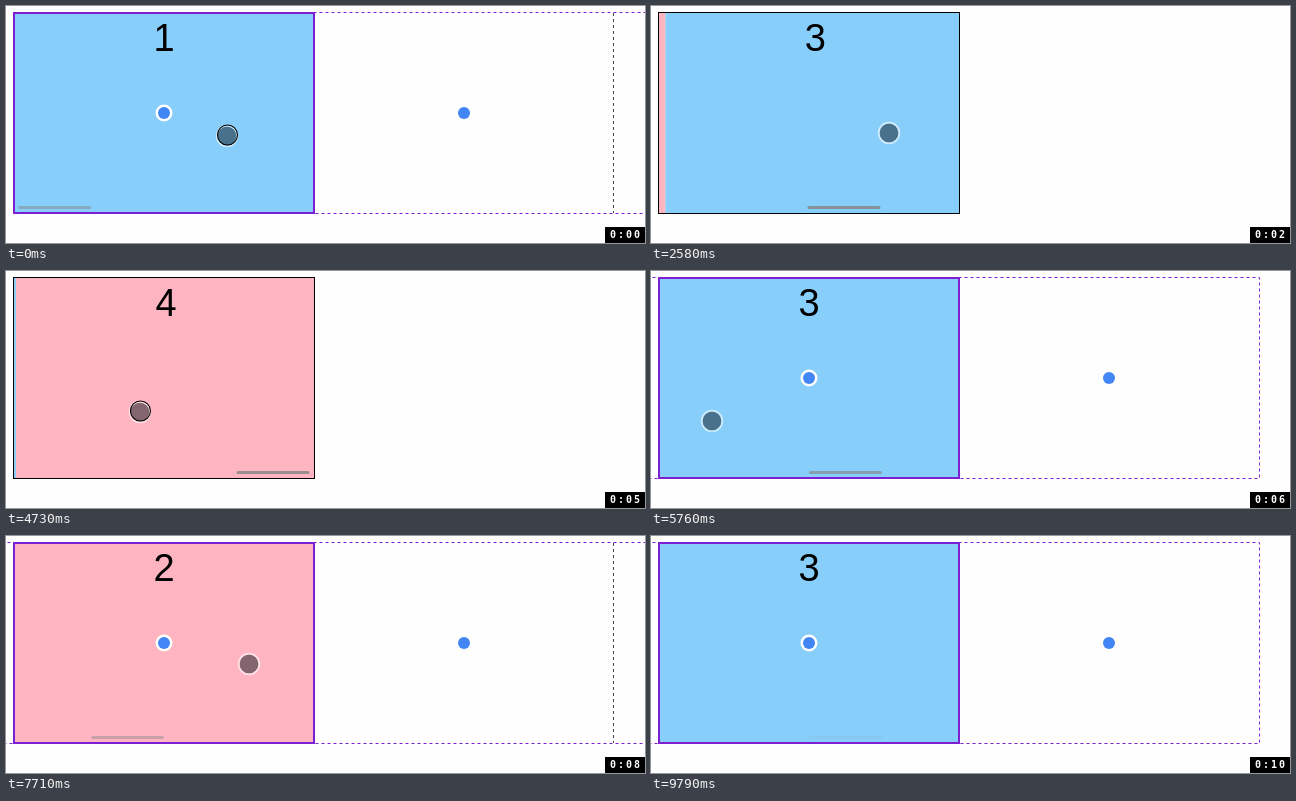
These frames come from a looping animation (639x237 px, 9.83 s). An HTML page with a canvas:

```html
<!DOCTYPE html>
<html lang="en">
<head>
<meta charset="utf-8">
<title>Scroll snap</title>
<style>
html, body { margin: 0; width: 639px; height: 237px; overflow: hidden; background: #fefefe; }
canvas { display: block; }
</style>
</head>
<body>
<canvas id="stage" width="639" height="237"></canvas>
<script>
const ctx = document.getElementById('stage').getContext('2d');
const LOOP = 9830, PAGE = 300, LEFT = 8, TOP = 7, HEIGHT = 200;
const DRAG = 400, TAU = 120, SETTLE = 600, FADE = 400;
const PURPLE = '#7d1fd2';

// Each swipe: drag start time, page left behind, finger path
const swipes = [
  { start: 670, page: 0, from: [221, 130], to: [120, 135] },
  { start: 1778, page: 1, from: [238, 127], to: [122, 134] },
  { start: 3250, page: 2, from: [238, 127], to: [124, 138] },
  { start: 4676, page: 3, from: [132, 141], to: [235, 143] },
  { start: 6522, page: 2, from: [61, 150], to: [224, 147] },
  { start: 8435, page: 1, from: [243, 128], to: [130, 133] },
];
const exit = [540, 252];

const clamp = v => Math.max(0, Math.min(1, v));
const smooth = v => v * v * (3 - 2 * v);
const mix = (a, b, p) => a.map((v, i) => v + (b[i] - v) * p);

function stateAt(t) {
  const i = swipes.findLastIndex(s => t >= s.start);
  const next = swipes[i + 1];
  const lead = i < 0 ? 670 : 100;
  const pressed = !!next && t > next.start - lead - 1;
  if (i < 0) return { scroll: 0, finger: next.from, pressed, idle: true, bar: 0.6 };

  const { start, page, from, to } = swipes[i];
  const age = t - start, origin = page * PAGE;
  if (age < DRAG) {
    const finger = mix(from, to, (age / DRAG) ** 2);
    return { scroll: origin + from[0] - finger[0], finger, pressed: true, idle: false, bar: 1 };
  }
  const since = age - DRAG, idle = since > SETTLE;
  const travel = from[0] - to[0];
  const target = Math.sign(travel) * PAGE;
  const rest = idle ? 0 : (target - travel) * Math.exp(-since / TAU);
  const back = smooth(clamp((since - 165) / (next ? 230 : 600)));
  return {
    scroll: origin + target - rest,
    finger: mix(to, next ? next.from : exit, back),
    pressed, idle,
    bar: 1 - clamp((since - SETTLE) / FADE),
  };
}

function circle(x, y, r, fill, stroke, width = 1) {
  ctx.beginPath();
  ctx.arc(x, y, r, 0, 2 * Math.PI);
  if (fill) { ctx.fillStyle = fill; ctx.fill(); }
  if (stroke) { ctx.strokeStyle = stroke; ctx.lineWidth = width; ctx.stroke(); }
}

function drawScroller({ scroll, bar }) {
  ctx.save();
  ctx.beginPath();
  ctx.rect(LEFT, TOP, PAGE, HEIGHT);
  ctx.clip();
  ctx.font = '38px "Liberation Sans", Arial, sans-serif';
  ctx.textAlign = 'center';
  for (let i = 0; i < 4; i++) {
    const x = LEFT + i * PAGE - scroll;
    ctx.fillStyle = i % 2 ? '#ffb4c1' : '#87cefa';
    ctx.fillRect(x, TOP, PAGE, HEIGHT);
    ctx.fillStyle = '#000';
    ctx.fillText(i + 1, x + PAGE / 2, 45);
  }
  ctx.globalAlpha = bar;
  ctx.fillStyle = 'rgba(136,136,136,.85)';
  ctx.beginPath();
  ctx.roundRect(12 + scroll * 0.2433, 200, 73, 3, 1.5);
  ctx.fill();
  ctx.restore();
  ctx.strokeStyle = '#000';
  ctx.lineWidth = 1;
  ctx.strokeRect(LEFT - 0.5, TOP - 0.5, PAGE + 1, HEIGHT + 1);
}

function drawOverlay(scroll) {
  const x0 = LEFT - scroll;
  ctx.save();
  ctx.beginPath();
  ctx.rect(0, 0, LEFT, 237);
  ctx.rect(LEFT + PAGE, 0, 639, 237);
  ctx.clip();
  ctx.lineWidth = 1;
  ctx.setLineDash([3, 3]);
  ctx.strokeStyle = '#444';
  ctx.beginPath();
  for (let i = 1; i < 4; i++) {
    ctx.moveTo(x0 + i * PAGE - 0.5, TOP);
    ctx.lineTo(x0 + i * PAGE - 0.5, TOP + HEIGHT);
  }
  ctx.stroke();
  ctx.strokeStyle = PURPLE;
  ctx.strokeRect(x0 - 0.5, TOP - 0.5, 4 * PAGE + 1, HEIGHT + 1);
  ctx.restore();

  ctx.strokeStyle = PURPLE;
  ctx.lineWidth = 2;
  ctx.strokeRect(LEFT, TOP, PAGE, HEIGHT);
  for (let i = 0; i < 4; i++) {
    const x = x0 + (i + 0.5) * PAGE;
    if (x > LEFT && x < LEFT + PAGE) circle(x, 107, 8.5, '#fff');
    circle(x, 107, 6, '#4285f4');
  }
}

function drawFinger([x, y], pressed) {
  circle(x, y, 9.5, 'rgba(18,28,36,.52)');
  circle(x, y, 10.3, null, 'rgba(255,255,255,.6)', 1.8);
  if (pressed) circle(x + 0.5, y - 1, 10, null, '#000', 1.1);
}

function drawClock(t) {
  ctx.fillStyle = '#000';
  ctx.fillRect(599, 221, 40, 16);
  ctx.fillStyle = '#fff';
  ctx.font = 'bold 10px "DejaVu Sans Mono", monospace';
  ctx.textAlign = 'center';
  const label = '0:' + String(Math.floor((t + 340) / 1000)).padStart(2, '0');
  [...label].forEach((c, i) => ctx.fillText(c, 607 + i * 8, 232));
}

function frame() {
  const t = performance.now() % LOOP;
  const state = stateAt(t);
  ctx.fillStyle = '#fefefe';
  ctx.fillRect(0, 0, 639, 237);
  drawScroller(state);
  if (state.idle) drawOverlay(state.scroll);
  drawFinger(state.finger, state.pressed);
  drawClock(t);
  requestAnimationFrame(frame);
}
frame();
</script>
</body>
</html>
```
